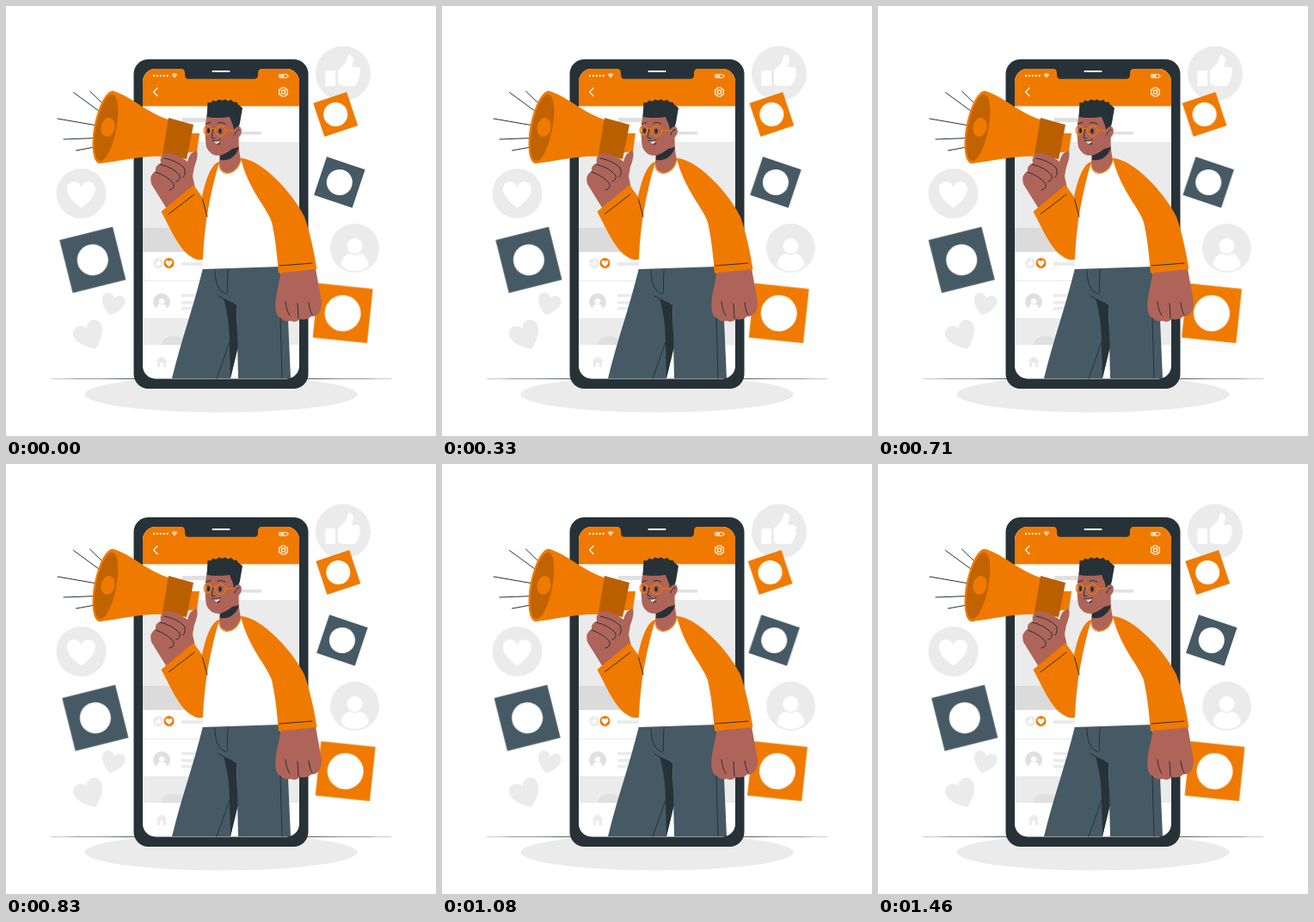
These frames come from a looping animation (500x500 px, 1500 ms). An HTML page without scripts:

```html
<!DOCTYPE html>
<html lang="en">
<head>
<meta charset="utf-8">
<title>Social media promotion</title>
<style>
  html, body { margin: 0; width: 100%; height: 100%; overflow: hidden; background: #fff; }
  svg { display: block; width: 100%; height: 100%; }
  .orange { fill: #f07a00; }
  .rust { fill: #b95f00; }
  .slate { fill: #455a64; }
  .dark { fill: #263238; }
  .skin { fill: #ae6459; }
  .pale { fill: #ebebeb; }
  .grey { fill: #e0e0e0; }
  .white { fill: #fff; }
  .line { fill: none; stroke: #263238; stroke-width: 1; stroke-linecap: round; stroke-linejoin: round; }
  .thin { fill: none; stroke: #fff; stroke-width: 1.2; stroke-linecap: round; stroke-linejoin: round; }
  .trim { fill: none; stroke: #f07a00; stroke-width: 1.2; }
  .shake { animation: shake 1.5s ease infinite; }
  @keyframes shake {
    0%, 100% { transform: translateX(0); }
    10%, 90% { transform: translateX(-1px); }
    20%, 80% { transform: translateX(2px); }
    30%, 50%, 69.5% { transform: translateX(-4px); }
    41%, 59% { transform: translateX(4px); }
  }
</style>
</head>
<body>
<svg viewBox="0 0 500 500">
  <defs>
    <path id="heart" d="M0 15C-22 0-17-14-8-14C-3-14 0-10 0-7C0-10 3-14 8-14C17-14 22 0 0 15z"/>
    <path id="thumb" d="M371.500 75h11.500v18h-11.500zM386 75L395 66L398 57Q404 56 404 63L402 71H409Q414 73 411 78Q413 81 410 84Q411 88 408 89Q408 93 403 93H391L386 91z"/>
    <g id="user"><circle cy="-3" r="9"/><path d="M-16 20C-16 10-9 6-5 6Q0 9 5 6C9 6 16 10 16 20Q0 33-16 20z"/></g>
    <clipPath id="screen"><rect x="159" y="73" width="182" height="360.500" rx="15"/></clipPath>
  </defs>

  <!-- Floor and pale icons -->
  <ellipse class="pale" cx="250" cy="451.500" rx="158.500" ry="21"/>
  <ellipse class="dark" cx="250" cy="433.300" rx="200" ry=".4"/>
  <circle class="pale" cx="392" cy="78.500" r="32"/>
  <use href="#thumb" class="white"/>
  <circle class="pale" cx="87.500" cy="218" r="29"/>
  <use href="#heart" class="white" transform="translate(87.500 219) scale(1.05)"/>
  <circle class="pale" cx="405.500" cy="281.500" r="28.500"/>
  <use href="#user" class="white" transform="translate(405.500 282)"/>
  <use href="#heart" class="pale" transform="translate(124 347) rotate(15) scale(.86)"/>
  <use href="#heart" class="pale" transform="translate(97.500 383.500) rotate(-24) scale(1.12)"/>

  <!-- Phone -->
  <rect class="dark" x="148.500" y="62" width="203" height="383" rx="17"/>
  <g clip-path="url(#screen)">
    <path class="white" d="M159 73h182v361H159z"/>
    <path class="orange" d="M159 73h182v43.500H159z"/>
    <path class="grey" d="M205 130h53v5h-53zM262 146h35v3.500h-35z"/>
    <path class="pale" d="M159 158h182v128H159z"/>
    <path fill="#dbdbdb" d="M159 258h182v28H159z"/>
    <path class="pale" d="M204 298h27v4h-27zM159 319h182v1H159zM204 335h24v3.500h-24zM204 343h24v3.500h-24zM204 350h24v3.500h-24zM159 363h182v31H159z"/>
    <path class="grey" d="M181 394a13.500 10.500 0 0 1 27 0z"/>
    <circle class="pale" cx="177" cy="299" r="6"/>
    <use href="#thumb" class="white" transform="translate(118 284) scale(.15 .19)"/>
    <circle class="orange" cx="189.500" cy="299" r="6.500" stroke="#fff"/>
    <use href="#heart" class="white" transform="translate(189.500 299.300) scale(.25)"/>
    <circle class="grey" cx="181" cy="344" r="10"/>
    <use href="#user" class="white" transform="translate(181 344.500) scale(.36)"/>
    <path class="pale" d="M181 407L188 413H186V420H183V415H179V420H176V413H174z"/>
  </g>
  <path class="dark" d="M203 72.500Q208 73 208 78V80Q208 84.700 212 84.700H289Q293 84.700 293 80V78Q293 73 298 72.500z"/>
  <path d="M240.500 76h19" stroke="#fff" stroke-width="2" stroke-linecap="round"/>
  <path d="M172 81.200h17" stroke="#fff" stroke-width="2.200" stroke-linecap="round" stroke-dasharray="0 3.900"/>
  <path d="M192.500 79.500Q196 77 199.500 79.500L196 84z" fill="#ffd2a0"/>
  <rect x="317.500" y="79.500" width="9.500" height="4" rx="1" fill="none" stroke="#fff" stroke-width=".8"/>
  <path class="white" d="M318.500 80.500h5v2h-5zM327.500 80.500h1v2h-1z"/>
  <path class="thin" d="M176 95.500L171.500 100L176 104.500"/>
  <path class="thin" d="M320.500 95h4l.8 1.800l2 .4v5.600l-2 .4l-.8 1.800h-4l-.8-1.800l-2-.4v-5.600l2-.4z"/>
  <circle class="thin" cx="322.500" cy="100" r="2.200"/>

  <!-- Floating tiles -->
  <g class="shake">
    <g transform="translate(383.200 126) rotate(-18.500)"><path class="orange" d="M-20.500-20.500h41v41h-41z"/><circle class="white" r="14"/></g>
    <g transform="translate(387.800 205) rotate(18.500)"><path class="slate" d="M-23.500-23.500h47v47h-47z"/><circle class="white" r="15"/></g>
    <g transform="translate(100.800 295.200) rotate(-14)"><path class="slate" d="M-31.800-31.800h63.600v63.600h-63.600z"/><circle class="white" r="18"/></g>
    <g transform="translate(391.600 357.200) rotate(6)"><path class="orange" d="M-31.800-31.800h63.600v63.600h-63.600z"/><circle class="white" r="21"/></g>
  </g>

  <!-- Trousers -->
  <path class="slate" d="M229 305L262 305L270 396L261 433H193C204 388 218 350 229 305z"/>
  <path class="slate" d="M245 305L317 302C323 325 328 345 328 365L331 433H270L268 347L250 338z"/>
  <path class="dark" d="M253 340L268 347L269.500 397L261 433L260 393C260 375 258 358 253 340z"/>
  <path class="line" d="M260 391Q256 402 245 433M243 307C243 322 247 332 256 335M258 307C257 322 258 330 257 334M247 337L254 341M319 363L321 433"/>

  <!-- Shirt -->
  <path class="white" d="M248 182L273 177L300 215L320 303L229 306C229 265 236 225 248 182z"/>

  <!-- Head and neck -->
  <path class="skin" d="M249 160L271 148C270 160 271 170 273 178C271 188 264 194 256 194Q248 191 248 182z"/>
  <path class="dark" d="M249 170L271 164C268 174 260 181 249 179z"/>
  <path class="trim" stroke-width="2" d="M247.500 182Q248 193 256 194.500C265 194 271 188 273.500 177"/>
  <path class="skin" d="M234 125L270 124V155C267 164 259 171 248 174Q237 174 233 164C231 152 231 137 234 125z"/>
  <path class="dark" d="M233.500 129L234.500 112L238 112.500L241 109.500L244 111L248 108.500L251 110L255 108.500L258 110.500L262 109L265 112L268 111.500L270 114.500L275 118.500L272 136L270 143L266 149L264 139L260 129Q246 131 233.500 129z"/>
  <ellipse class="skin" cx="269" cy="147" rx="4.600" ry="7" transform="rotate(18 269 147)"/>
  <path class="line" d="M266 150Q267 144 271 144M232.500 137L238 135.500M246 136Q250 134 255 137M241 142L239 153L243 154"/>
  <ellipse class="dark" cx="235.500" cy="145" rx="1.700" ry="3"/>
  <ellipse class="dark" cx="249" cy="145.500" rx="1.800" ry="3"/>
  <ellipse class="trim" cx="234.500" cy="144.500" rx="4.300" ry="5.300"/>
  <circle class="trim" cx="249.500" cy="145.500" r="5.800"/>
  <path class="trim" d="M239 143Q241 141 244 143.500M255.300 144.500L267 145"/>
  <path class="white" d="M242 157Q245 158 248 156.500Q247 160 244 160z"/>
  <path class="line" d="M240 156.500Q245 158.500 249 155.500M246 161L249 160"/>

  <!-- Right arm -->
  <path class="skin" d="M320 308L314 338C312 354 314 361 320 363Q324 368 331 366Q337 369 342 364Q349 366 355 361Q367 361 367 344L360 305z"/>
  <path class="line" d="M325 344Q326 354 330 360M339 346L340 363M352 345Q353 354 356 359"/>
  <path class="orange" d="M273 177C296 178 332 215 347 245C353 262 358 284 361.500 306L317 310.500C315 288 313 268 309 251C303 234 281 212 273 177z"/>
  <path class="line" d="M318 302L356 299"/>

  <!-- Megaphone -->
  <path class="line" d="M78.500 100.500L112 125M97.500 99L118 119M60 131L106 139M67 155L106 153.500M81.500 168L109 163"/>
  <path class="orange" d="M125 99C146 105 166 126 192 133L185 175C160 173 135 180 109 183z"/>
  <ellipse class="orange" cx="116.500" cy="141" rx="14" ry="43" transform="rotate(11 116.500 141)"/>
  <ellipse fill="#c06300" cx="116.500" cy="141.500" rx="11.800" ry="39.500" transform="rotate(11 116.500 141.500)"/>
  <ellipse class="orange" cx="118.500" cy="141" rx="8" ry="11" transform="rotate(11 118.500 141)"/>
  <path class="orange" d="M213 148L225 148L222 169L208 171z"/>
  <path class="rust" d="M189 130L218 138L210 178L182 172z"/>

  <!-- Left arm and hand -->
  <path class="skin" d="M187 236L169 207Q166 196 174 192Q173 185 180 183Q178 175 185 171Q194 170 207 178L211 181Q214 169 222 168Q224 175 219 187L217 198L220 212L195 240z"/>
  <path class="line" d="M184 177Q199 180 207 188Q210 194 206 199M179 184Q195 188 202 197Q203 203 198 204M174 193Q190 199 195 207Q196 213 190 214"/>
  <path class="orange" d="M248 181C238 184 232 203 228 222L218 208L180.500 239C193 263 202 284 216 292Q224 297 229 294.500C230 255 238 215 248 181z"/>
  <path class="line" d="M189 242L219 219M228.500 225L234 245"/>
</svg>
</body>
</html>
```
